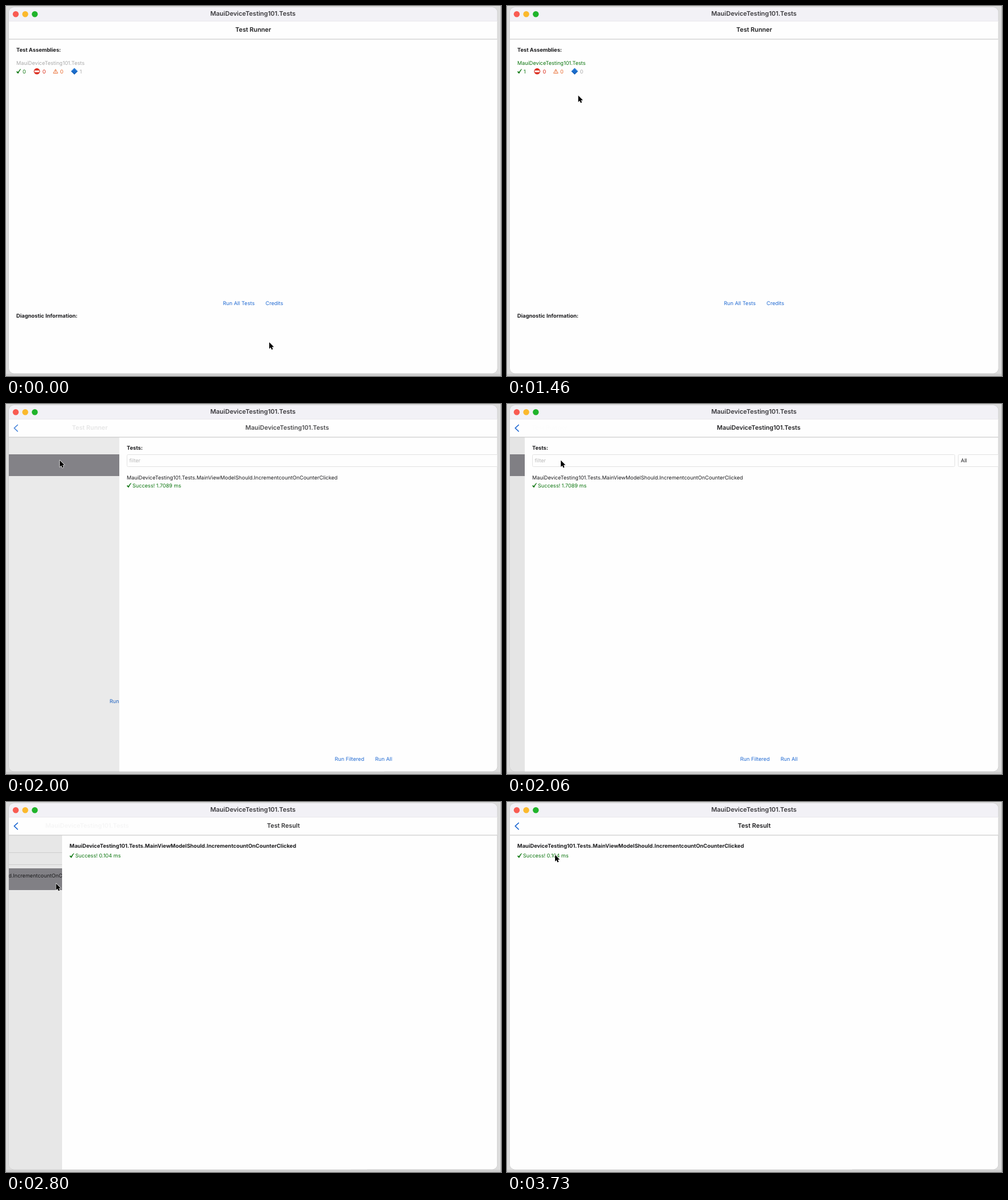
Write an HTML page that moves like this. It is 865 px wide and 647 px high and loops after 4060 ms.

```html
<!DOCTYPE html>
<html lang="en">
<head>
<meta charset="utf-8">
<title>Test Runner</title>
<style>
  html, body { margin: 0; width: 100%; height: 100%; overflow: hidden; background: #dcdcdc; }
  svg { display: block; width: 865px; height: 647px; }
  text { font: 9.08px Inter, "Liberation Sans", sans-serif; fill: #1c1c1e; white-space: pre; text-rendering: geometricPrecision; }
  .bold { font-weight: 700; font-size: 9.32px; }
  .title { font-weight: 600; font-size: 10.75px; text-anchor: middle; }
  .window-title { font-size: 10.98px; fill: #3a393d; }
  .hint { fill: #b8b8b8; }
  .link { fill: #1f69d2; font-size: 9.12px; }
  .green { fill: #0b750e; }
  .red { fill: #d9230f; }
  .orange { fill: #e8672a; }
  .gray { fill: #a9a9a9; }
  .field { fill: #fefefe; stroke: #e2e2e2; }
  .row { fill: #8e8d92; }
  .page { fill: #fefefe; }
</style>
</head>
<body>
<svg viewBox="0 0 865 647">
  <defs>
    <clipPath id="window"><rect x="5" y="2" width="853.5" height="640.5" rx="9"/></clipPath>
    <clipPath id="content"><rect x="5" y="58" width="853.5" height="585"/></clipPath>
    <path id="check" d="M0 5L1.5 3.9 2.9 5.5Q4.8 2 7.3 0L8 .5Q5.5 3.6 3.5 8.1H2.5Z"/>
  </defs>

  <rect width="865" height="647" fill="#dcdcdc"/>
  <rect y="643" width="865" height="4" fill="#cdcdcd"/>
  <rect x="864" width="1" height="647" fill="#b4b4b4"/>
  <rect x="5" y="2" width="853.5" height="640.5" rx="9" fill="#fefefe" stroke="#c4c4c4"/>

  <g clip-path="url(#window)">
    <g clip-path="url(#content)">
      <g id="runner">
        <rect class="page" x="5" y="58" width="854" height="585"/>
        <rect id="assemblyRow" class="row" x="5" y="88" width="854" height="38"/>
        <text class="bold" x="18" y="79.7">Test Assemblies:</text>
        <text id="assembly" x="18" y="103.3">MauiDeviceTesting101.Tests</text>
        <use href="#check" x="18" y="110" class="green"/>
        <text id="passed" class="green" x="29" y="117.5"></text>
        <g id="otherCounts">
          <circle cx="54" cy="114.2" r="5.4" fill="#dc3022"/>
          <rect x="49.8" y="112.8" width="8.4" height="2.9" rx=".7" fill="#fff"/>
          <text class="red" x="63.7" y="117.5">0</text>
          <path d="M86.6 110.6L90.5 117.5H82.7Z" fill="none" stroke="#e8672a" stroke-width=".9" stroke-linejoin="round"/>
          <path d="M86.6 112.7V115M86.6 115.7V116.6" stroke="#e8672a" stroke-width=".9"/>
          <text class="orange" x="94.4" y="117.5">0</text>
          <path d="M119.5 108.4L125.3 114.2 119.5 120 113.7 114.2Z" fill="#1560b8"/>
          <path d="M119.5 108.4L125.3 114.2H113.7Z" fill="#2f82dc"/>
          <path d="M119.5 110.3L123.4 114.2 119.5 118.1 115.6 114.2Z" fill="#1b6ccb"/>
          <text id="pending" class="gray" x="128.7" y="117.5"></text>
        </g>
        <text id="runAll" class="link" x="379" y="523.2">Run All Tests</text>
        <text class="link" x="453.5" y="523.2">Credits</text>
        <text class="bold" x="18" y="544.8">Diagnostic Information:</text>
        <rect class="dim" x="5" y="58" width="854" height="585"/>
      </g>

      <g id="list">
        <rect class="page" x="5" y="58" width="854" height="585"/>
        <text class="bold" x="18" y="79.7">Tests:</text>
        <rect class="field" x="18.5" y="88.5" width="738" height="21" rx="2"/>
        <text class="hint" x="22.5" y="102.4">filter</text>
        <rect class="field" x="762.5" y="88.5" width="84" height="21" rx="2"/>
        <text x="767" y="102.4">All</text>
        <rect id="testRow" class="row" x="5" y="116" width="854" height="38"/>
        <text x="18" y="131.6">MauiDeviceTesting101.Tests.MainViewModelShould.IncrementcountOnCounterClicked</text>
        <use href="#check" x="18" y="138" class="green"/>
        <text class="green" x="28" y="145.6">Success! 1.7089 ms</text>
        <text class="link" x="381.5" y="623.9">Run Filtered</text>
        <text class="link" x="452" y="623.9">Run All</text>
        <rect class="dim" x="5" y="58" width="854" height="585"/>
      </g>

      <g id="result">
        <rect class="page" x="5" y="58" width="854" height="585"/>
        <text class="bold" x="18" y="79.7">MauiDeviceTesting101.Tests.MainViewModelShould.IncrementcountOnCounterClicked</text>
        <use href="#check" x="18" y="89.5" class="green"/>
        <text class="green" x="28" y="97">Success! 0.104 ms</text>
      </g>
    </g>

    <rect x="5" y="26" width="854" height="32" fill="#fefefe"/>
    <rect x="5" y="57.5" width="854" height="1" fill="#c2c2c2"/>
    <text id="runnerTitle" class="title" x="432" y="45.4">Test Runner</text>
    <text id="listTitle" class="title" x="432" y="45.4">MauiDeviceTesting101.Tests</text>
    <text id="resultTitle" class="title" x="432" y="45.4">Test Result</text>
    <path id="back" d="M20.3 36.6L14.3 42.2 20.3 47.8" fill="none" stroke="#1f69d2" stroke-width="1.6" stroke-linecap="round" stroke-linejoin="round"/>

    <rect x="5" y="2" width="854" height="24.5" fill="#f2f1f6"/>
    <rect x="5" y="26" width="854" height=".7" fill="#e4e3e8"/>
    <circle cx="17" cy="14.2" r="5.2" fill="#f95b52"/>
    <circle cx="33.6" cy="14.2" r="5.2" fill="#fbb92d"/>
    <circle cx="50.3" cy="14.2" r="5.2" fill="#20b42b"/>
    <text class="title window-title" x="431.5" y="17.4">MauiDeviceTesting101.Tests</text>
  </g>

  <path id="cursor" d="M0 0V11.4L2.6 9 4.3 13 6.4 12.1 4.7 8.2H8.2Z" fill="#000" stroke="#fff" stroke-width="1.3" stroke-linejoin="round" paint-order="stroke"/>
</svg>

<script>
  const LOOP = 4060, FPS = 15, PAGE_WIDTH = 853;
  const el = {};
  document.querySelectorAll('[id]').forEach(node => el[node.id] = node);

  // Cursor stops: step, x, y
  const stops = [
    [0, 460, 588], [7, 408, 521], [9, 408, 521], [18, 124.5, 156.5], [22, 124.5, 156.5],
    [26, 94, 98.5], [33, 94, 98.5], [38, 87.5, 142.5], [43, 87.5, 142.5], [49, 84, 92.5]
  ];

  const show = (node, opacity) => node.setAttribute('opacity', opacity);
  const move = (node, x, y = 0) => node.setAttribute('transform', `translate(${x.toFixed(2)} ${y.toFixed(2)})`);
  const slide = (page, part) => move(page, Math.round(PAGE_WIDTH * part));

  // Critically damped spring, 0 to 1
  function spring(steps) {
    const x = Math.max(0, steps) * 2.525;
    return 1 - (1 + x) * Math.exp(-x);
  }

  function cursorAt(step) {
    const next = stops.findIndex(stop => stop[0] > step);
    if (next < 0) return stops[stops.length - 1].slice(1);
    const [s0, x0, y0] = stops[next - 1], [s1, x1, y1] = stops[next];
    const k = (step - s0) / (s1 - s0), ease = k * k * (3 - 2 * k);
    return [x0 + (x1 - x0) * ease, y0 + (y1 - y0) * ease];
  }

  function cover(page, p) {
    slide(page, -0.3 * p);
    show(page.querySelector('.dim'), 0.1 * p);
  }

  function leaveTitle(title, left, p) {
    move(title, (32 - left) * p);
    show(title, (1 - p) ** 1.5);
  }

  function enterTitle(title, distance, p) {
    move(title, distance * (1 - p));
    show(title, p);
  }

  function render(time) {
    const step = Math.floor((time % LOOP + 7) * FPS / 1000);
    const toList = spring(step - 28.88), toResult = spring(step - 40.505);
    const done = step >= 12;

    el.passed.textContent = done ? 1 : 0;
    el.pending.textContent = done ? 0 : 1;
    el.assembly.setAttribute('class', done ? 'green' : 'gray');
    move(el.otherCounts, done ? -1.3 : 0);
    show(el.runAll, step >= 9 && step < 12 ? 0.35 : 1);
    show(el.assemblyRow, step >= 28 ? 1 : 0);
    show(el.testRow, step >= 39 ? 1 : 0);

    cover(el.runner, toList);
    cover(el.list, toResult);
    leaveTitle(el.runnerTitle, 401, toList);
    if (toResult > 0) {
      leaveTitle(el.listTitle, 358, toResult);
    } else {
      slide(el.list, 1 - toList);
      enterTitle(el.listTitle, 262, toList);
    }
    slide(el.result, 1 - toResult);
    enterTitle(el.resultTitle, 482, toResult);
    show(el.back, toList);

    move(el.cursor, ...cursorAt(step));
  }

  const start = performance.now();
  function tick() {
    render(performance.now() - start);
    requestAnimationFrame(tick);
  }
  tick();
</script>
</body>
</html>
```
